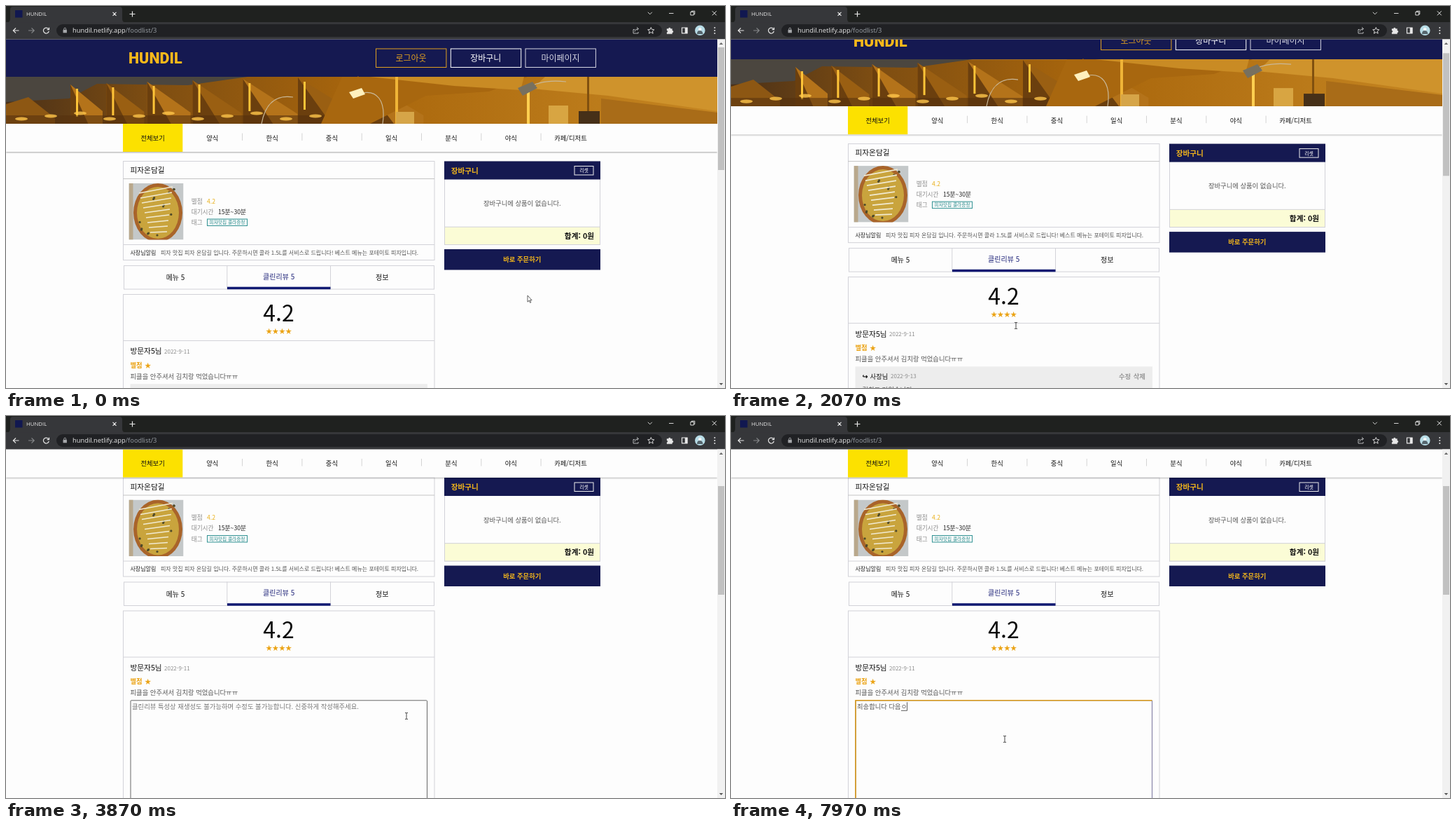
Write an HTML page that moves like this. It is 1027x545 px and loops after 8000 ms.

```html
<!DOCTYPE html>
<html lang="ko">
<head>
<meta charset="utf-8">
<title>HUNDIL</title>
<style>
html, body { margin: 0; width: 100%; height: 100%; overflow: hidden; background: #fdfdfd; }
svg { display: block; width: 1027px; height: 545px; }
text { font-family: "Noto Sans CJK KR", "Noto Sans KR", "Noto Sans CJK", sans-serif; white-space: pre; }
.ui { font-family: "Open Sans", "Noto Sans", sans-serif; }
.brand { font-family: Roboto, sans-serif; }
</style>
</head>
<body>
<svg id="stage" viewBox="0 0 1027 545" xmlns="http://www.w3.org/2000/svg"></svg>
<script>
const NAVY = '#151951', GOLD = '#f0b41c', ORANGE = '#eba314', INK = '#111', GREY = '#8c8c8c', LINE = '#d2d2d8';
const LOOP = 8000, OPEN = 3630, FOCUS = 4930;

// y is the vertical middle of the line
const text = (x, y, size, str, fill = INK, weight = 400, anchor = 'start', cls = '') =>
  `<text x="${x}" y="${y + size * 0.37}" font-size="${size}" fill="${fill}" font-weight="${weight}" text-anchor="${anchor}" class="${cls}">${str}</text>`;
const mid = (x, y, size, str, fill, weight) => text(x, y, size, str, fill, weight, 'middle');
const rect = (x, y, w, h, fill, stroke = 'none', extra = '') =>
  `<rect x="${x}" y="${y}" width="${w}" height="${h}" fill="${fill}" stroke="${stroke}" ${extra}/>`;
const path = (d, stroke, width = 1, fill = 'none') =>
  `<path d="${d}" stroke="${stroke}" stroke-width="${width}" fill="${fill}"/>`;
const poly = (pts, fill) => `<polygon points="${pts}" fill="${fill}"/>`;
const range = n => [...Array(n).keys()];

function banner() {
  const tents = range(7).map(i => {
    const x = 92 + i * 48 + i * i * 3.4, w = 46 + i * 8;
    return poly(`${x},${112 - i * 2} ${x + w},${150 + i} ${x + w},168 ${x},168`, i % 2 ? '#9a5f12' : '#b4731a') +
      poly(`${x},${112 - i * 2} ${x + w * 0.55},168 ${x},168`, '#6b3f0e') +
      rect(x + 8, 118 - i * 2, 3, 40, '#ffc438');
  }).join('');
  const glow = range(12).map(i =>
    `<ellipse cx="${22 + i * 42}" cy="${161 - (i % 3) * 4}" rx="9" ry="2.6" fill="#ffc64a" opacity=".8"/>`).join('');
  return rect(0, 101, 1016, 67, 'url(#dusk)') +
    poly('0,101 345,101 260,113 130,111 90,132 0,137', '#4b463f') +
    poly('0,140 32,130 70,160 70,168 0,168', '#8d5713') + tents +
    rect(0, 156, 520, 12, '#54300d', 'none', 'opacity=".55"') + glow +
    poly('480,101 745,101 690,122 600,128 520,168 450,168', '#a8670f') +
    poly('520,101 740,101 735,120 640,114', '#c98b24') +
    poly('770,101 1016,101 1016,150 860,128 752,118', '#cf932c') +
    poly('850,132 1016,152 1016,168 850,168', '#a96c18') +
    rect(556, 101, 4, 67, '#f0b437') + rect(744, 122, 4, 46, '#ffcf50') + rect(830, 101, 3, 67, '#80500f') +
    rect(557, 151, 26, 17, '#d6a548') + rect(775, 142, 28, 26, '#d8a542') + rect(818, 150, 30, 18, '#463018') +
    path('M365 168C370 140 385 126 410 130M505 125C530 118 543 135 538 168M742 120Q760 104 800 108', '#c9b899', 1.2) +
    poly('490,123 508,117 513,126 496,132', '#fff0bd') + poly('731,117 752,108 759,117 738,128', '#77705f');
}

function pizza() {
  const dots = range(14).map(i =>
    `<circle cx="${216 + 25 * Math.sin(i * 2.4)}" cy="${294 + 33 * Math.cos(i * 3.7)}" r="1.6" fill="#4f4a2a"/>`).join('');
  const zig = range(9).map(i => `M${190 + i * 2} ${267 + i * 7}L${238 - i} ${258 + i * 8}`).join('');
  return `<g clip-path="url(#photo)">${rect(175.5, 253, 78, 80.5, '#c4c8c9')}` +
    rect(175.5, 253, 6, 80.5, '#b9a88c') +
    `<ellipse cx="217" cy="295" rx="35" ry="42" fill="#a9642a"/><ellipse cx="217" cy="295" rx="30" ry="37" fill="#c9a43d"/>` +
    dots + path(zig, '#f1ead0', 1.7) + '</g>';
}

function header() {
  const btn = (x, str, fg, w) => rect(x + .5, 61, 100.4, 26.5, 'none', fg) + mid(x + 50.5, 74.7, 12, str, fg, w);
  return rect(0, 47, 1016, 54, NAVY) + text(175, 74.5, 21.5, 'HUNDIL', '#f8b81a', 900, 'start', 'brand') +
    btn(528, '로그아웃', '#e0a021', 500) + btn(634.8, '장바구니', '#fff', 500) + btn(741.5, '마이페이지', '#d5d6e2', 400);
}

function nav() {
  const items = ['전체보기', '양식', '한식', '중식', '일식', '분식', '야식', '카페/디저트'];
  return rect(0, 168, 1016, 40, '#fdfdfd', 'none', 'filter="url(#shade)"') + rect(167, 168, 85.3, 40, '#fce100') +
    items.map((s, i) => mid(209.6 + i * 85.27, 188.5, 9.33, s, INK, 500) +
      (i && i < 7 ? path(`M${252.3 + i * 85.3} 181.5v10.5`, '#d4d4d4') : '')).join('');
}

function shop() {
  return rect(167.5, 221.5, 444.5, 141, '#fdfdfd', LINE) + path('M167 246.5h445', '#c4c4c4') + path('M167 340.5h445', LINE) +
    text(177.5, 234.2, 10.67, '피자온담길', INK, 500) + pizza() +
    text(264.7, 278.5, 8.67, '별점', GREY) + text(287, 278.5, 8.67, '4.2', '#e9b11c', 500) +
    text(264.7, 293.4, 8.67, '대기시간', GREY) + text(303, 293.4, 8.67, '15분~30분', '#222', 500) +
    text(264.7, 308.8, 8.67, '태그', GREY) + rect(287.5, 304, 57, 9.5, 'none', '#2f9192') +
    mid(316, 308.9, 6.67, '피자맛집 콜라증정', '#238889') +
    text(177.5, 351.7, 8, '사장님알림', '#222', 500) +
    text(221, 351.7, 8, '피자 맛집 피자 온담길 입니다. 주문하시면 콜라 1.5L를 서비스로 드립니다! 베스트 메뉴는 포테이토 피자입니다.', '#555') +
    rect(168.5, 370.5, 443, 33.5, '#fdfdfd', LINE) + path('M315.8 370v34M463.5 370v34', LINE) + rect(316, 400.7, 147.5, 3.5, '#111a72') +
    mid(242, 387.3, 10, '메뉴 5', INK, 500) + mid(389.7, 386.2, 10, '클린리뷰 5', '#20257a', 500) + mid(537.3, 387.3, 10, '정보', INK, 500);
}

function cart() {
  return rect(626.5, 222, 222, 118.5, '#fdfdfd', LINE) + rect(626, 221.5, 223, 26, NAVY) +
    text(635.7, 234.8, 10.67, '장바구니', GOLD, 700) + rect(812, 228.5, 27, 12.5, 'none', '#eee') +
    mid(825.5, 234.9, 6.9, '리셋', '#fff', 500) + mid(737.3, 281.8, 9.33, '장바구니에 상품이 없습니다.', '#555') +
    rect(626.5, 315.2, 222, 25.3, '#fbfcd6', LINE) + text(840, 327.8, 10.67, '합계: 0원', INK, 700, 'end') +
    rect(626, 347, 223, 29.5, NAVY) + mid(737.3, 361.8, 9.33, '바로 주문하기', GOLD, 700);
}

function review(y, name, stars, body) {
  return text(177.5, y, 10.67, name, INK, 500) + text(226, y + .6, 8, '2022-9-11', GREY) +
    text(177.5, y + 19.6, 9.33, '별점', ORANGE, 700) + text(198, y + 19.6, 9.33, '★'.repeat(stars), ORANGE) +
    text(177.5, y + 35.6, 9.33, body, '#555');
}

function reviews() {
  return rect(167.5, 411.5, 444.5, 900, '#fdfdfd', LINE) + path('M167 477.5h445', LINE) +
    mid(389.5, 438.6, 32, '4.2', '#080808', 500) + mid(389.7, 464, 9.33, '★★★★', ORANGE) +
    review(492.5, '방문자5님', 1, '피클을 안주셔서 김치랑 먹었습니다ㅠㅠ') +
    `<g id="reply">${rect(177.5, 539.3, 424.5, 43.5, '#ededed')}` +
    text(187.5, 553, 9.33, '↪', INK, 700) + text(198.6, 553, 9.33, '사장님', INK, 500) + text(228, 553.4, 8, '2022-9-13', GREY) +
    text(554, 553, 9.33, '수정', '#999', 700) + text(574.7, 553, 9.33, '삭제', '#999', 700) +
    text(187.5, 572, 9.33, '김치도 맛있습니다.', '#555') + path('M167 590h445', LINE) +
    review(605.3, '방문자4님', 5, '맛있게 잘 먹었습니다') + '</g>' +
    `<g id="form">${rect(178, 539.3, 423.5, 220, '#fdfdfd', '#666', 'rx="1"')}` +
    `<g id="ring">${path('M601.5 539.3H178V760', '#dc9c1c', 1.6)}${path('M601.5 540v220', '#8784a8', 1.2)}</g>` +
    `<g id="hint">${text(180, 547.8, 9.33, '클린리뷰 특성상 재생성도 불가능하며 수정도 불가능합니다. 신중하게 작성해주세요.', '#777')}</g>` +
    `<g id="typed">${text(180, 547.8, 9.33, '', '#555')}</g>` + path('', '#333', .8).replace('<path', '<path id="caret"') + '</g>';
}

function chrome() {
  const W = '#e8e8e8';
  return rect(0, 0, 1027, 24, '#1f211f') + rect(0, 23, 1027, 24.5, '#36373a') +
    '<path d="M2 23.5Q6 23 6 18V5Q6 1 10 1H162Q166 1 166 5V18Q166 23 170 23.5Z" fill="#36373a"/>' +
    rect(13, 6, 10.5, 10.5, '#111850') + text(29, 11, 7.8, 'HUNDIL', W, 400, 'start', 'ui') +
    path('M152.5 8.8l5 5m0-5l-5 5M176.5 11.5h8m-4-4v8', W, 1.2) +
    path('M916.8 8.8l3 3 3-3M947 10.5h6.5', W, .9) + path('M1008.8 7.3l6 6m0-6l-6 6', W, 1) +
    path('M977.8 8.5h4.5v4.5h-4.5zM979.3 8.5v-1.3h4.5v4.5h-1.5', W, .9) +
    path('M18.5 35h-8m3.5-3.7l-3.7 3.7 3.7 3.7', W, 1.2) + path('M32 35h8m-3.5-3.7l3.7 3.7-3.7 3.7', '#85878a', 1.2) +
    path('M60.5 32.5A4 4 0 1 0 61.3 36M61.5 30.8v2.9h-2.9', W, 1.2) +
    rect(72, 26, 865, 18, '#202124', 'none', 'rx="9"') +
    rect(81.5, 34, 5.4, 4.3, '#a5a7aa') + path('M82.8 34v-1.4a1.4 1.4 0 0 1 2.8 0V34', '#a5a7aa') +
    text(95, 35, 9.33, 'hundil.netlify.app<tspan fill="#9aa0a6">/foodlist/3</tspan>', W, 400, 'start', 'ui') +
    path('M898 33.5h-2v5.5h7v-2M898 36.5q.5-4 5-4m-2-2.2l2.5 2.2-2.5 2.2', '#c5c7c9', .9) +
    path('M921.3 30.5l1.3 3 3.3.3-2.5 2.2.8 3.2-2.9-1.7-2.9 1.7.8-3.2-2.5-2.2 3.3-.3z', W, .9) +
    path('M944 32.5h2.3a1.5 1.5 0 0 1 3 0h2.2v2.4a1.5 1.5 0 0 1 0 3v1.9h-7.5v-2.3a1.3 1.3 0 0 0 0-2.6z', W, .3, W) +
    path('M965.5 31h7.5v7.8h-7.5z', W, 1.2) + rect(969.8, 31, 3.5, 8, W) +
    '<circle cx="991.3" cy="34.8" r="7.3" fill="#b7dce6"/><path d="M987 40q0-5 4-5t4.5 5z" fill="#55656d"/><circle cx="991.2" cy="33" r="2.3" fill="#f2f6f7"/>' +
    [31, 35, 39].map(y => `<circle cx="1012.3" cy="${y}" r="1" fill="${W}"/>`).join('');
}

const stage = document.getElementById('stage');
stage.innerHTML = `<defs>
  <linearGradient id="dusk"><stop offset="0" stop-color="#4a3018"/><stop offset=".2" stop-color="#7d4d12"/><stop offset=".5" stop-color="#a9660c"/><stop offset="1" stop-color="#c58622"/></linearGradient>
  <clipPath id="view"><rect y="47.5" width="1016" height="498"/></clipPath>
  <clipPath id="photo"><rect x="175.5" y="253" width="78" height="80.5"/></clipPath>
  <filter id="shade" x="-5%" y="-20%" width="110%" height="150%"><feDropShadow dx="0" dy="1" stdDeviation="1" flood-opacity=".35"/></filter>
</defs>${rect(0, 0, 1027, 545, '#fdfdfd')}
<g clip-path="url(#view)"><g id="page">${header() + banner() + shop() + cart() + reviews()}</g><g id="nav">${nav()}</g></g>
${chrome()}${rect(1016, 47.5, 11, 498, '#f1f1f1')}${poly('1018.8,55 1024.2,55 1021.5,52', '#666')}${poly('1018.8,538 1024.2,538 1021.5,541', '#555')}
<rect id="thumb" x="1017" width="9" fill="#c1c1c1"/>
<path id="arrow" d="M0 0v9.2l2.1-2 1.5 3.2 1.3-.6-1.5-3.1h2.7z" fill="#fff" stroke="#222" stroke-width=".7"/>
<path id="beam" d="M-2-4.5h1.4q.6 0 .6.7v7.6q0 .7-.6.7H-2M2-4.5H.6Q0-4.5 0-3.8M2 4.5H.6Q0 4.5 0 3.8" fill="none" stroke="#333" stroke-width=".9"/>`;

const el = {};
stage.querySelectorAll('[id]').forEach(n => el[n.id] = n);
const typedText = el.typed.firstChild;

const SCROLL = [[1970, 0], [2070, 24.5], [2230, 86.5], [2390, 133.5]];
const MOUSE = [[300, 745, 413], [1500, 407, 456], [2500, 407, 456], [3300, 570, 421],
  [3600, 570, 421], [3780, 572, 428], [4250, 572, 428], [4850, 391, 461]];
const FIRST = ['ㅈ', '조', '죄', '죗', '죄소', '죄송', '죄송ㅎ', '죄송하', '죄송합', '죄송합ㄴ'];
const THEN = ['니', '닏', '니다', '니다 ', '니다 ㄷ', '니다 다', '니다 당', '니다 다으', '니다 다음', '니다 다음ㅇ'];
const KEYS = [...FIRST.map((s, i) => [5120 + i * 115, s]), ...THEN.map((s, i) => [6340 + i * 177, '죄송합' + s])];

const smooth = u => u * u * (3 - 2 * u);
function along(keys, t, ease = u => u) {
  if (t <= keys[0][0]) return keys[0].slice(1);
  for (let i = 1; i < keys.length; i++) {
    const a = keys[i - 1], b = keys[i];
    if (t < b[0]) {
      const u = ease((t - a[0]) / (b[0] - a[0]));
      return a.slice(1).map((v, k) => v + (b[k + 1] - v) * u);
    }
  }
  return keys[keys.length - 1].slice(1);
}
const show = (node, on) => node.setAttribute('visibility', on ? 'inherit' : 'hidden');
const move = (node, x, y) => node.setAttribute('transform', `translate(${x} ${y})`);

function draw(t) {
  const [scroll] = along(SCROLL, t), open = t >= OPEN, focus = t >= FOCUS;
  move(el.page, 0, -scroll);
  move(el.nav, 0, Math.max(-scroll, -120.5));
  el.thumb.setAttribute('y', 59 + scroll * (open ? .307 : .335));
  el.thumb.setAttribute('height', open ? 155 : 175);
  show(el.reply, !open);
  show(el.form, open);
  show(el.ring, focus);

  const str = KEYS.reduce((s, k) => t >= k[0] ? k[1] : s, '');
  show(el.hint, open && !str);
  if (typedText.textContent !== str) typedText.textContent = str;
  const x = 180.3 + (str ? typedText.getComputedTextLength() : 0);
  const composing = str && !str.endsWith(' ');
  el.caret.setAttribute('d', `M${x} 541.8v12` + (composing ? `h-8.6` : ''));
  show(el.caret, focus);

  const [mx, my] = along(MOUSE, t, smooth);
  const arrow = t < 2000 ? mx > 480 : t > 3050 && t < OPEN;
  show(el.arrow, arrow);
  show(el.beam, !arrow);
  move(el.arrow, mx, my);
  move(el.beam, mx, my);
}

const start = performance.now();
function tick() {
  draw((performance.now() - start) % LOOP);
  requestAnimationFrame(tick);
}
tick();
</script>
</body>
</html>
```
